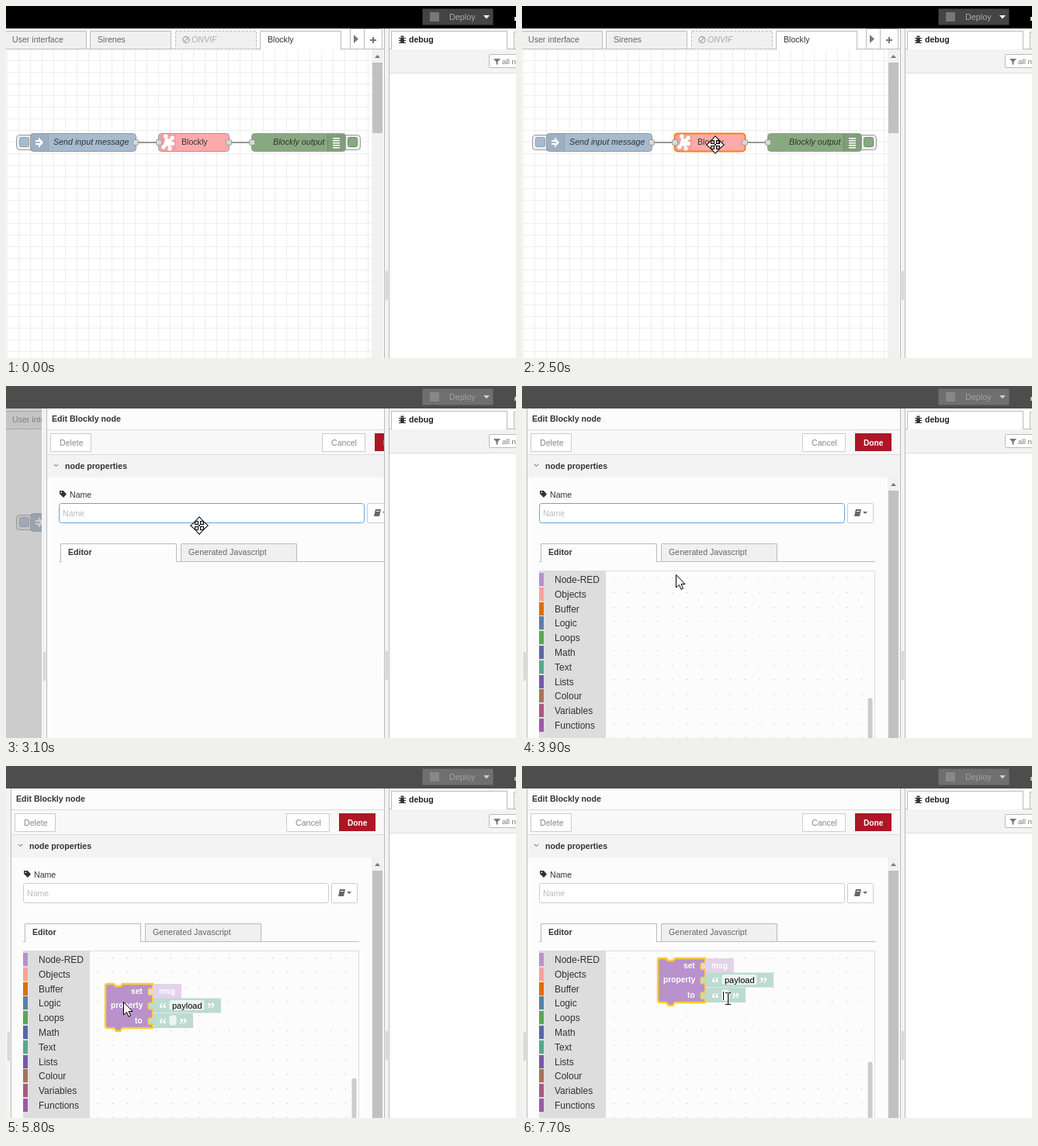
An HTML page with a canvas that plays this animation: 657x454 px, repeating every 8000 ms.

```html
<!DOCTYPE html>
<html lang="en">
<head>
<meta charset="utf-8">
<title>Flow editor</title>
<style>
html, body { margin: 0; width: 100%; height: 100%; overflow: hidden; background: #fff; }
canvas { display: block; }
</style>
</head>
<body>
<canvas id="stage" width="657" height="454"></canvas>
<script>
const g = document.getElementById('stage').getContext('2d');
const SANS = '"Liberation Sans", Arial, sans-serif';
const PURPLE = '#b991cb', PALE = '#e3d3ea', TEAL = '#bddbd1';
const LOOP = 8000;

const CATEGORIES = [
  ['Node-RED', PURPLE], ['Objects', '#ff9e9e'], ['Buffer', '#e06d08'], ['Logic', '#5b80a5'],
  ['Loops', '#5ba55b'], ['Math', '#5b67a5'], ['Text', '#5ba58c'], ['Lists', '#745ba5'],
  ['Colour', '#a5745b'], ['Variables', '#a55b80'], ['Functions', '#995ba5']
];

// Pointer path: time, x, y
const PATH = [
  [200, 624, 57], [400, 520, 97], [700, 340, 135], [1000, 287, 145], [1300, 288, 156],
  [1600, 201, 196], [1800, 238, 208], [1900, 249, 192], [2200, 249, 179], [3700, 249, 180],
  [3900, 198, 243], [4100, 140, 258], [4300, 97, 251], [4600, 95, 250], [5100, 95, 250],
  [5600, 145, 314], [6000, 156, 294], [6200, 167, 281], [6500, 196, 272], [6700, 198, 271],
  [7300, 262, 298], [7500, 265, 300]
];

function pointerAt(t) {
  const i = PATH.findIndex(p => p[0] > t);
  if (i < 0) return PATH[PATH.length - 1].slice(1);
  const [t0, x0, y0] = PATH[i - 1], [t1, x1, y1] = PATH[i];
  const k = (t - t0) / (t1 - t0);
  return [Math.round(x0 + (x1 - x0) * k), Math.round(y0 + (y1 - y0) * k)];
}

function rect(x, y, w, h, fill) {
  g.fillStyle = fill;
  g.fillRect(x, y, w, h);
}

function box(x, y, w, h, fill, stroke, r = 0, line = 1) {
  g.beginPath();
  g.roundRect(x + .5, y + .5, w - 1, h - 1, r);
  if (fill) { g.fillStyle = fill; g.fill(); }
  if (stroke) { g.strokeStyle = stroke; g.lineWidth = line; g.stroke(); }
}

function text(s, x, y, color = '#333', style = '', size = 10.6) {
  g.font = `${style} ${size}px ${SANS}`;
  g.fillStyle = color;
  g.fillText(s, x, y);
}

function poly(points, fill, stroke, line = 1) {
  g.beginPath();
  points.forEach(([x, y]) => g.lineTo(x, y));
  if (fill) { g.closePath(); g.fillStyle = fill; g.fill(); }
  if (stroke) { g.strokeStyle = stroke; g.lineWidth = line; g.stroke(); }
}

function triangle(x, y, w, h, fill) {
  poly([[x - w, y], [x + w, y], [x, y + h]], fill);
}

function scrollbar(top, thumbTop, thumbBottom) {
  rect(471, top, 15, 454 - top, '#f1f1f1');
  triangle(478.5, top + 11, 3.5, -4, '#777');
  rect(472, thumbTop, 13, thumbBottom - thumbTop, '#c1c1c1');
}

function header() {
  rect(0, 0, 657, 29, '#000');
  box(536, 3, 92, 22, '#444', null);
  rect(546, 8, 12, 12, '#777');
  text('Deploy', 571, 18, '#aaa', '', 10.8);
  triangle(619, 12, 4, 4.5, '#fff');
  rect(655, 14, 2, 5, '#ddd');
}

function sidebar() {
  rect(487, 29, 170, 425, '#fff');
  rect(487, 29, 1, 425, '#bbb');
  rect(488, 29, 5, 425, '#f3f3f3');
  rect(493, 29, 1, 425, '#bbb');
  box(489, 342, 3, 37, '#e4e4e4', '#ccc');
  rect(494, 55, 163, 1, '#bbb');
  box(496, 32, 150, 25, '#fff', '#bbb');
  rect(494, 56, 163, 30, '#f3f3f3');
  box(654, 33, 10, 23, '#f0f0f0', '#bbb');
  rect(494, 86, 163, 1, '#ddd');
  // bug
  g.beginPath();
  g.ellipse(510.5, 44.5, 2.6, 3.6, 0, 0, 7);
  g.fillStyle = '#333';
  g.fill();
  rect(508.5, 38.5, 4, 2, '#333');
  for (const y of [41, 44, 47]) rect(506, y, 9, 1, '#333');
  text('debug', 519, 47, '#222', 'bold');
  box(622, 62, 40, 18, '#fff', '#bbb', 1);
  poly([[628, 68], [637, 68], [633.5, 72], [633.5, 76], [631.5, 75], [631.5, 72]], '#777');
  text('all n', 639, 75, '#777', '', 9.8);
}

function port(x) { box(x, 172, 8, 8, '#d9d9d9', '#999', 2); }

function flowNode(x, w, fill, selected) {
  box(x, 164, w, 24, fill, selected ? '#ff7f0e' : '#999', 4, selected ? 2 : 1);
}

function flow(t) {
  const shaded = t >= 2900;
  rect(0, 29, 487, 425, '#fff');
  if (!shaded) {
    for (let x = 1; x < 471; x += 15) rect(x, 56, 1, 398, '#eee');
    for (let y = 70; y < 454; y += 15) rect(0, y, 471, 1, '#eee');
  }
  rect(0, 55, 487, 1, '#bbb');
  [['User interface', -1, 8], ['Sirenes', 108, 118], ['ONVIF', 218, 239], ['Blockly', 327, 337]]
    .forEach(([label, x, tx], i) => {
      const off = i === 2, active = i === 3;
      g.setLineDash(off ? [3, 2] : []);
      box(x, 32, 105, active ? 25 : 24, active ? '#fff' : '#f0f0f0', '#bbb');
      g.setLineDash([]);
      if (active) rect(x + 1, 55, 103, 2, '#fff');
      text(label, tx, 47, off ? '#aaa' : active ? '#333' : '#666', off ? 'italic' : '');
    });
  g.beginPath();
  g.arc(232, 43.5, 4, 0, 7);
  g.moveTo(229, 46.5);
  g.lineTo(235, 40.5);
  g.strokeStyle = '#aaa';
  g.lineWidth = 1.3;
  g.stroke();
  box(443, 29, 19, 27, '#fff', '#bbb');
  box(461, 29, 24, 27, '#fff', '#bbb');
  poly([[448, 37], [454, 42.5], [448, 48]], '#777');
  rect(469, 43, 8, 2, '#777');
  rect(472, 40, 2, 8, '#777');
  scrollbar(56, 73, 164);

  rect(167, 175, 30, 2, '#999');
  rect(287, 175, 30, 2, '#999');
  box(13, 166, 30, 20, '#eee', '#999', 4);
  box(17, 169, 13, 13, '#a6bbcf', '#8da2b6', 2);
  flowNode(31, 137, '#a6bbcf');
  rect(32, 165, 22, 22, 'rgba(0,0,0,.06)');
  rect(54, 165, 1, 22, 'rgba(0,0,0,.12)');
  poly([[38, 173], [42, 173], [42, 169], [48, 176], [42, 183], [42, 179], [38, 179]], '#fff');
  rect(38, 175, 6, 2, '#a6bbcf');
  text('Send input message', 61, 179, '#333', 'italic', 10.7);
  flowNode(196, 92, '#ffaaaa', t >= 2500);
  rect(198, 166, 21, 20, 'rgba(0,0,0,.06)');
  // puzzle piece
  g.save();
  g.translate(208.5, 176);
  g.rotate(.25);
  rect(-4.5, -5, 9, 10, '#fff');
  for (const [x, y] of [[-4.5, -7], [4, -7], [-4, 7], [4.5, 7], [6, 0]]) {
    g.beginPath();
    g.arc(x, y, 2.8, 0, 7);
    g.fill();
  }
  g.restore();
  text('Blockly', 226, 179);
  box(427, 166, 30, 20, '#eee', '#999', 4);
  box(440, 169, 13, 13, '#87a980', '#6f9168', 2);
  flowNode(316, 122, '#87a980');
  rect(414, 165, 23, 22, 'rgba(0,0,0,.06)');
  rect(414, 165, 1, 22, 'rgba(0,0,0,.12)');
  for (let y = 170; y < 184; y += 3) rect(421, y, 9, 1.5, '#fff');
  text('Blockly output', 344, 179, '#333', 'italic', 10.7);
  [163, 193, 283, 313].forEach(port);
}

function piece(x, y, w, h, fill, { tab, notch, glow } = {}) {
  g.beginPath();
  g.moveTo(x, y + 3);
  g.quadraticCurveTo(x, y, x + 3, y);
  if (notch) [[11, 0], [13, 3], [20, 3], [22, 0]].forEach(([a, b]) => g.lineTo(x + a, y + b));
  g.lineTo(x + w, y);
  g.lineTo(x + w, y + h);
  if (notch) [[22, 0], [19, 4], [14, 4], [11, 0]].forEach(([a, b]) => g.lineTo(x + a, y + h + b));
  g.lineTo(x + 3, y + h);
  g.quadraticCurveTo(x, y + h, x, y + h - 3);
  if (tab) {
    g.lineTo(x, y + 15);
    g.bezierCurveTo(x, y + 11, x - 6, y + 19, x - 6, y + 10);
    g.bezierCurveTo(x - 6, y + 2, x, y + 9, x, y + 5);
  }
  g.closePath();
  g.fillStyle = fill;
  g.fill();
  if (glow) { g.strokeStyle = '#fc3'; g.lineWidth = 2.4; g.stroke(); }
}

function label(s, x, y) { text(s, x, y, '#fff', 'bold', 10.2); }

function message(x, y, fill = PALE) {
  piece(x, y, 37, 19, fill, { tab: true });
  label('msg', x + 8, y + 13);
}

function string(x, y, value) {
  const w = value ? 46 : 10;
  piece(x, y, w + 42, 19, TEAL, { tab: true });
  g.font = 'bold 20px "Liberation Serif", Times, serif';
  g.fillStyle = '#fff';
  g.fillText('“', x + 8, y + 20.5);
  g.fillText('”', x + w + 24, y + 20.5);
  box(x + 21, y + 2, w, 14, '#ebf5f1', null, 3);
  text(value, x + 25, y + 13, '#000', '', 11);
}

function setBlock(x, y, glow) {
  piece(x, y, 61, 57, PURPLE, { notch: true, glow });
  label('set', x + 33, y + 13);
  label('property', x + 7, y + 31);
  label('to', x + 38, y + 51);
  message(x + 61, y);
  string(x + 61, y + 18.5, 'payload');
  string(x + 61, y + 38, '');
  if (glow) for (const dy of [0, 18.5, 38]) {
    g.beginPath();
    g.moveTo(x + 61, y + dy + 5);
    g.bezierCurveTo(x + 61, y + dy + 9, x + 55, y + dy + 2, x + 55, y + dy + 10);
    g.bezierCurveTo(x + 55, y + dy + 19, x + 61, y + dy + 11, x + 61, y + dy + 15);
    g.strokeStyle = '#fc3';
    g.lineWidth = 1.5;
    g.stroke();
  }
}

function flyout() {
  rect(108, 238, 347, 216, 'rgba(221,221,221,.85)');
  piece(121, 245, 228, 28, PURPLE, { tab: true });
  label('get', 128, 262);
  message(157, 250);
  label('property', 200, 262);
  string(253, 250, 'payload');
  setBlock(121, 292);
  piece(121, 371, 165, 26, PURPLE, { notch: true });
  label('send', 128, 387);
  message(166, 375);
  label('to output', 209, 387);
  box(256, 377, 26, 13, PALE, null, 3);
  text('1', 260, 387, '#000', '', 11);
  triangle(273, 382, 2.5, 3, PURPLE);
  message(121, 419, PURPLE);
}

function blockly(t) {
  const open = t >= 4800 && t < 5700;
  rect(108, 238, 347, 216, '#fcfcfc');
  for (let y = 247; y < 454; y += 18.75)
    for (let x = 118; x < 450; x += 18.75) rect(Math.round(x), Math.round(y), 1, 1, '#bbb');
  rect(22, 238, 433, 1, '#ddd');
  rect(454, 238, 1, 216, '#ddd');
  box(445, t >= 6700 ? 381 : 402, 7, 90, '#ccc', null, 3);
  rect(22, 238, 86, 216, '#ddd');
  CATEGORIES.forEach(([name, color], i) => {
    const y = 241 + i * 18.8, on = open && !i;
    rect(22, Math.round(y), on ? 86 : 6, 17, color);
    text(name, 42, y + 13, on ? '#fff' : '#333', '', 12);
  });
  if (open) flyout();
  if (t >= 5700) {
    const [px, py] = pointerAt(Math.min(t, 6700));
    setBlock(px - 23, py - 23, true);
  }
  if (t >= 7700) {
    box(257, 289, 9, 14, '#fff', null, 1);
    rect(259, 291, 1, 11, '#000');
  }
}

function button(s, x, w) {
  box(x, 61, w, 24, '#fff', '#ccc');
  text(s, x + 12, 77, '#888');
}

function tray(t) {
  const p = Math.min(1, (t - 2900) / 250);
  const focused = t < 4500;
  g.save();
  g.beginPath();
  g.rect(0, 29, 487, 425);
  g.clip();
  g.translate(Math.round(480 * (.5 + Math.cos(Math.PI * p) / 2)), 0);
  rect(0, 29, 487, 425, '#fcfcfc');
  rect(0, 29, 6, 425, '#f3f3f3');
  rect(6, 29, 1, 425, '#bbb');
  box(2, 343, 3, 37, '#e4e4e4', '#ccc');
  rect(7, 57, 480, 31, '#f8f8f8');
  rect(7, 56, 480, 1, '#ddd');
  rect(7, 88, 480, 30, '#f3f3f3');
  rect(7, 88, 480, 1, '#ddd');
  text('Edit Blockly node', 13, 46, '#333', 'bold');
  button('Delete', 11, 53);
  button('Cancel', 361, 56);
  rect(429, 61, 47, 23, '#ad1625');
  text('Done', 440, 77, '#fff', 'bold', 10.2);
  poly([[16, 101], [18.5, 103.5], [21, 101]], null, '#555');
  text('node properties', 30, 107, '#333', 'bold');
  poly([[23, 135], [28, 135], [32, 139.5], [28, 144], [23, 139]], '#333');
  rect(24.5, 136.5, 1.5, 1.5, '#fff');
  text('Name', 36, 144);
  box(22, 151, 394, 26, '#fff', focused ? '#62a5e0' : '#ccc', 3);
  text('Name', 27, 168, '#bbb');
  if (focused && t >= 3200 && (t < 3600 || t >= 4100)) rect(27, 158, 1, 12, '#000');
  box(419, 151, 34, 26, '#fff', '#ccc', 1);
  poly([[430, 159], [437, 159], [435, 168], [428, 168]], '#666');
  rect(431, 161, 4, 1, '#fff');
  triangle(442, 162, 3, 3, '#666');
  rect(22, 226, 433, 1, '#bbb');
  box(24, 203, 150, 25, '#fcfcfc', '#bbb');
  rect(23, 227, 152, 2, '#fcfcfc');
  box(179, 203, 150, 24, '#f0f0f0', '#bbb');
  text('Editor', 34, 218, '#333', 'bold');
  text('Generated Javascript', 189, 218, '#666');
  scrollbar(118, 135, 454);
  if (t >= 3200) blockly(t);
  g.restore();
}

function cross(x, y) {
  rect(x - 12, y - 1, 24, 2, '#000');
  rect(x - 1, y - 12, 2, 24, '#000');
}

function mover(x, y) {
  g.save();
  g.translate(x, y);
  const arm = [[-1, -1], [-1, -6], [-4, -6], [0, -10.5], [4, -6], [1, -6], [1, -1]];
  for (const pass of [0, 1])
    for (let i = 0; i < 4; i++) {
      g.rotate(Math.PI / 2);
      poly(arm, '#fff', pass ? null : '#000', 2);
    }
  g.restore();
}

function arrow(x, y) {
  const tip = [[0, 0], [0, 16.5], [4, 13], [6.5, 18.8], [9, 17.7], [6.6, 12], [11.5, 12]];
  poly([...tip, [0, 0]].map(([a, b]) => [x + a + .5, y + b + .5]), '#fff', '#000');
}

function beam(x, y) {
  rect(x, y - 7, 1, 15, '#000');
  for (const dy of [-8, 7]) {
    rect(x - 3, y + dy, 3, 1, '#000');
    rect(x + 1, y + dy, 3, 1, '#000');
  }
}

function pointer(t) {
  if (t < 200) return;
  const [x, y] = pointerAt(t);
  const onNode = x > 197 && x < 287 && y > 164 && y < 188;
  let draw = arrow;
  if (t < 3200 && x < 471) draw = onNode ? mover : cross;
  else if (t >= 7300) draw = beam;
  draw(x, y);
}

function frame(now) {
  const t = Math.floor(now % LOOP / 100) * 100;
  header();
  flow(t);
  if (t >= 2900) {
    rect(0, 0, 657, 29, 'rgba(153,153,153,.5)');
    rect(0, 29, 487, 425, 'rgba(153,153,153,.5)');
    tray(t);
  }
  sidebar();
  pointer(t);
  requestAnimationFrame(() => frame(performance.now() - start));
}

const start = performance.now();
frame(0);
</script>
</body>
</html>
```
